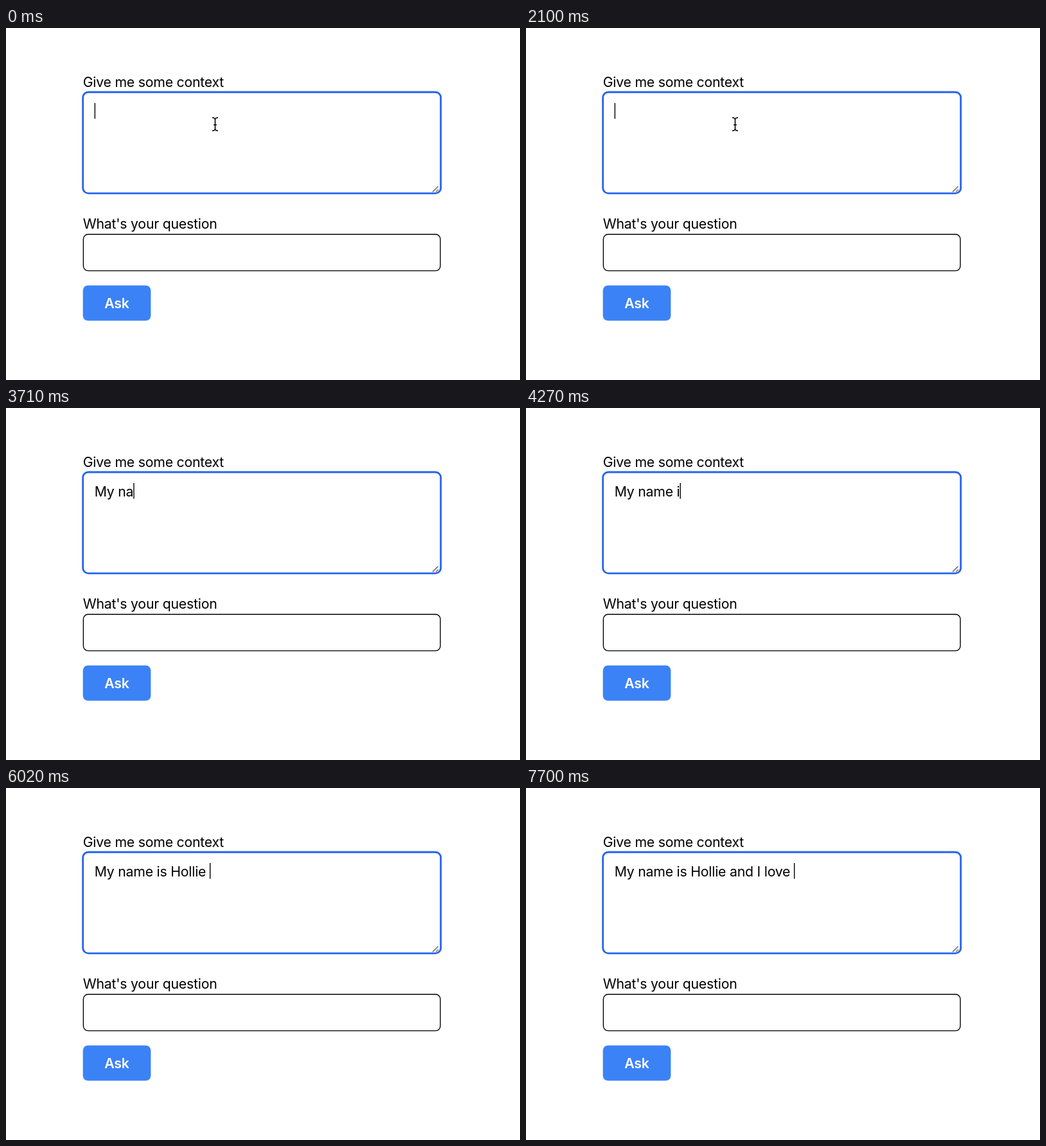
Animation of 800x549 px, one loop 8 s. Source, as an HTML page:

```html
<!DOCTYPE html>
<html lang="en">
<head>
<meta charset="utf-8">
<title>Question form</title>
<style>
  html, body { margin: 0; width: 100%; height: 100%; overflow: hidden; background: #fff; }
  svg { display: block; width: 800px; height: 549px; }
  text { font: 21.3px Inter, "Open Sans", sans-serif; letter-spacing: -0.25px; white-space: pre; }
  .button-label { font-weight: 600; fill: #fff; text-anchor: middle; }
  .line { fill: none; stroke: #000; stroke-width: 1.4; }
</style>
</head>
<body>
<svg viewBox="0 0 800 549">
  <text x="119.7" y="92">Give me some context</text>
  <rect x="119.7" y="100" width="557" height="157.8" rx="8.3" fill="#fff" stroke="#2563eb" stroke-width="2.8"/>
  <path class="line" style="stroke: #555; stroke-width: 1.2" d="M664 255.5L672.5 247M669.3 255.5L673 251.8"/>
  <text id="typed" x="137.7" y="138"></text>
  <rect id="caret" y="117" width="1.4" height="24.6"/>
  <path id="pointer" class="line" style="stroke-width: 1.6"
        d="M-4.5 -10.3Q-.6 -10.3 0 -7.4Q.6 -10.3 4.5 -10.3M0 -7.4V7.4M-4.5 10.3Q-.6 10.3 0 7.4Q.6 10.3 4.5 10.3M-2.4 1H2.4"/>

  <text x="119.7" y="313">What's your question</text>
  <rect class="line" x="120.4" y="321.8" width="555.6" height="56.8" rx="7.5"/>

  <rect x="119.7" y="401.5" width="105.7" height="55" rx="8" fill="#3b82f6"/>
  <text class="button-label" x="172.5" y="437">Ask</text>
</svg>
<script>
  const LOOP = 8000;
  const TEXT_LEFT = 137.7;
  const MESSAGE = "My name is Hollie and I love ";
  // Time at which each character of the message is typed.
  const KEY_TIMES = [
    2870, 3150, 3360,
    3570, 3710, 3850, 4060, 4130,
    4270, 4340, 4410,
    4900, 5040, 5250, 5320, 5390, 5530, 5670,
    6090, 6160, 6300, 6370,
    6790, 6860,
    7070, 7210, 7350, 7560, 7700
  ];
  const BLINKS = [490, 1050, 1540, 2100, 2590, 2870];

  const [typed, caret, pointer] = ["typed", "caret", "pointer"].map(id => document.getElementById(id));
  const countPassed = (times, t) => times.filter(time => time <= t).length;
  const show = (element, visible) => element.setAttribute("visibility", visible ? "visible" : "hidden");

  function draw(t) {
    const text = MESSAGE.slice(0, countPassed(KEY_TIMES, t));
    if (typed.textContent !== text) typed.textContent = text;
    const width = text ? typed.getComputedTextLength() : 0;
    caret.setAttribute("x", TEXT_LEFT + width);
    show(caret, countPassed(BLINKS, t) % 2 === 0);

    // Typing hides the pointer; a small nudge brings it back briefly.
    const pointerX = t < 2870 ? 325.5 : t < 5600 ? 322.8 : 323.5;
    pointer.setAttribute("transform", `translate(${pointerX} 150)`);
    show(pointer, t < 2870 || (t >= 5460 && t < 6020));
  }

  const start = performance.now();
  function frame() {
    draw((performance.now() - start) % LOOP);
    requestAnimationFrame(frame);
  }
  frame();
</script>
</body>
</html>
```
